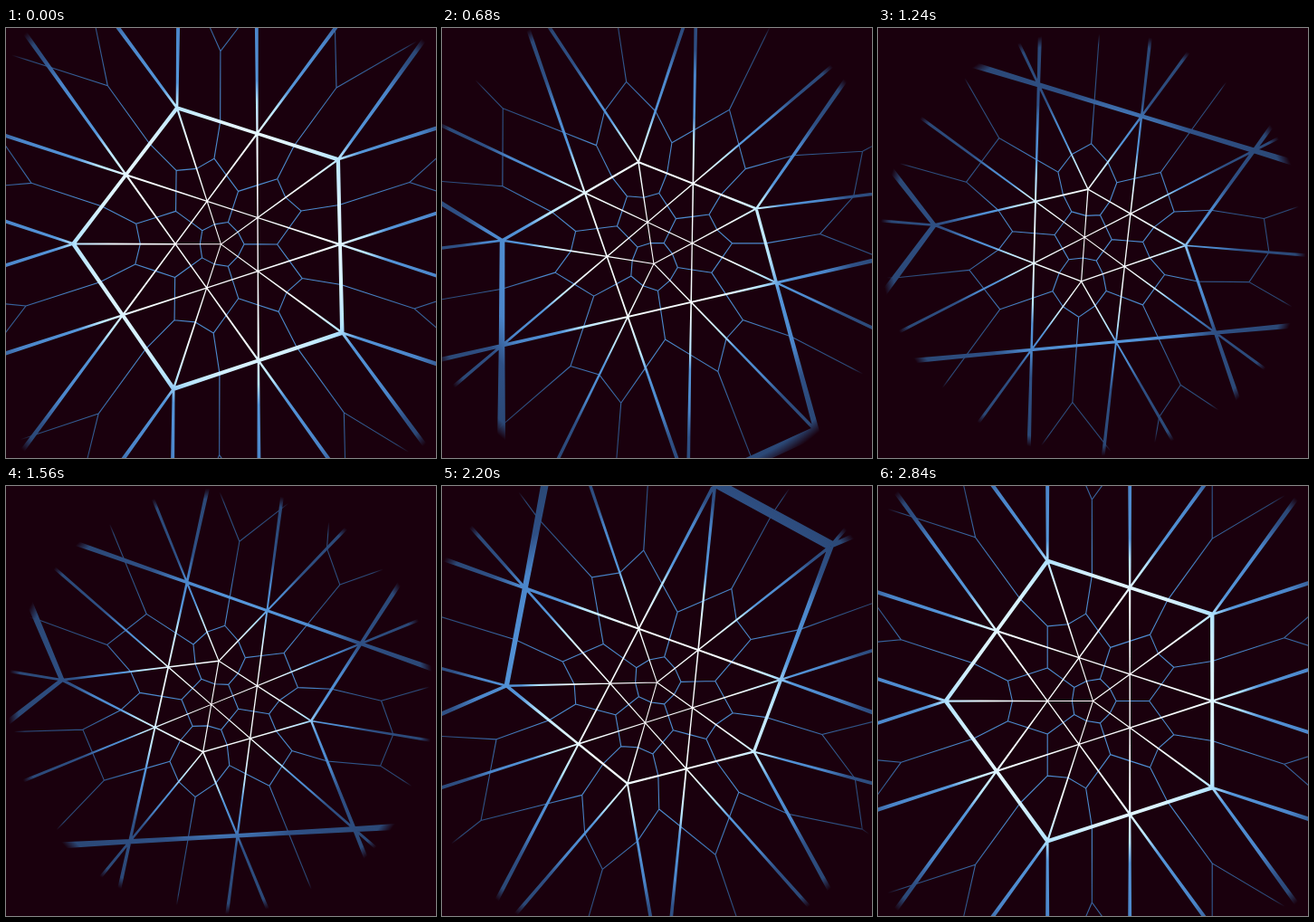
These frames come from a looping animation (475x475 px, 2880 ms). An HTML page:

```html
<!DOCTYPE html>
<html>
<head>
<meta charset="utf-8">
<title>Icosahedral sphere from inside</title>
<style>
html, body { margin: 0; width: 100%; height: 100%; overflow: hidden; background: #1a000d; }
svg { display: block; width: 100vw; height: 100vh; }
</style>
</head>
<body>
<svg viewBox="0 0 475 475">
  <defs>
    <radialGradient id="bold" gradientUnits="userSpaceOnUse" cx="237.5" cy="237.5"></radialGradient>
    <radialGradient id="fine" gradientUnits="userSpaceOnUse" cx="237.5" cy="237.5"></radialGradient>
  </defs>
  <path id="dual" fill="none" stroke="url(#fine)" stroke-width="1.1"/>
  <path id="mesh" fill="url(#bold)"/>
</svg>
<script>
const LOOP = 2880, STEP = 40, MID = 237.5, FOCAL = 81.4, NEAR = 0.17;
const HALF = 0.52 / FOCAL; // half the ribbon width on the unit sphere
const RAD = Math.PI / 180;
const $ = id => document.getElementById(id);

const sum = (...ps) => ps.reduce((s, p) => s.map((v, i) => v + p[i]), [0, 0, 0]);
const scale = (p, k) => p.map(v => v * k);
const dot = (a, b) => a[0] * b[0] + a[1] * b[1] + a[2] * b[2];
const unit = p => scale(p, 1 / Math.sqrt(dot(p, p)));
const center = (...ps) => unit(sum(...ps));
const cross = (a, b) => [a[1] * b[2] - a[2] * b[1], a[2] * b[0] - a[0] * b[2], a[0] * b[1] - a[1] * b[0]];

// Icosahedron with its poles on the first coordinate, the spin axis
const h = 1 / Math.sqrt(5);
const verts = [[1, 0, 0], [-1, 0, 0]];
for (let k = 0; k < 5; k++) {
  const ring = (x, deg) => [x, 2 * h * Math.cos(deg * RAD), 2 * h * Math.sin(deg * RAD)];
  verts.push(ring(h, 72 * k), ring(-h, 72 * k + 36));
}
const near = (a, b) => Math.abs(dot(a, b) - h) < 0.01;

const ribbons = [], threads = [];
function addRibbon(a, b) {
  const n = scale(unit(cross(a, b)), HALF), m = scale(n, -1);
  ribbons.push([sum(a, n), sum(b, n), sum(b, m), sum(a, m)]);
}
function addCell(a, b, c) {
  const mid = center(a, b, c);
  for (const [p, q] of [[a, b], [b, c], [c, a]]) threads.push([mid, center(p, q)]);
}

verts.forEach((a, i) => verts.forEach((b, j) => {
  if (j <= i || !near(a, b)) return;
  const ab = center(a, b);
  addRibbon(a, ab);
  addRibbon(ab, b);
  verts.forEach((c, k) => {
    if (k <= j || !near(a, c) || !near(b, c)) return;
    const bc = center(b, c), ca = center(c, a);
    addRibbon(ab, bc);
    addRibbon(bc, ca);
    addRibbon(ca, ab);
    addCell(a, ab, ca);
    addCell(b, bc, ab);
    addCell(c, ca, bc);
    addCell(ab, bc, ca);
  });
}));

// One fifth of a turn per loop around a gently swaying axis
function camera(phase) {
  const c = 1 - Math.cos(phase), s = Math.sin(phase), s2 = Math.sin(2 * phase);
  const spin = 72 * phase / (2 * Math.PI) - 0.3 * s + 0.3 * s2;
  const tilt = 63.435 + 0.95 * c + 0.15 * s + 0.15 * s2;
  const roll = 3.6 * c - 2.64 * s - 0.56 * s2;
  const [cs, ss, ct, st, cr, sr] =
    [spin, tilt, roll].flatMap(a => [Math.cos(a * RAD), Math.sin(a * RAD)]);
  return p => {
    const u = p[1] * cs - p[2] * ss, v = p[1] * ss + p[2] * cs;
    const x = ct * u - st * p[0], z = ct * p[0] + st * u;
    return [x * cr - v * sr, x * sr + v * cr, z];
  };
}

// Keep the part of a polyline or polygon in front of the near plane
function clip(pts, closed) {
  const out = [];
  pts.forEach((p, i) => {
    if (p[2] >= NEAR) out.push(p);
    if (!closed && i === pts.length - 1) return;
    const q = pts[(i + 1) % pts.length];
    if ((p[2] < NEAR) !== (q[2] < NEAR)) {
      const k = (NEAR - p[2]) / (q[2] - p[2]);
      out.push(p.map((v, n) => v + (q[n] - v) * k));
    }
  });
  return out;
}

function trace(shapes, view, closed) {
  let d = "";
  for (const shape of shapes) {
    const pts = clip(shape.map(view), closed);
    if (pts.length < 2) continue;
    d += "M" + pts.map(([x, y, z]) =>
      (MID + FOCAL * x / z).toFixed(2) + " " + (MID + FOCAL * y / z).toFixed(2)).join("L");
    if (closed) d += "Z";
  }
  return d;
}

function shade(id, radius, stops) {
  const g = $(id);
  g.setAttribute("r", radius);
  g.innerHTML = stops.map(([at, color, alpha = 1]) =>
    `<stop offset="${at}" stop-color="${color}" stop-opacity="${alpha}"/>`).join("");
}

function draw(time) {
  const frame = Math.floor((time % LOOP) / STEP) + 1;
  const phase = 2 * Math.PI * frame * STEP / LOOP;
  const view = camera(phase), c = Math.cos(phase);
  const reach = 275 + 42 * c;
  const white = 0.475 + 0.055 * c, blue = 0.74 + 0.1 * c;
  shade("bold", reach, [
    [0, "#ffffff"], [white - 0.16, "#f4fdff"], [white - 0.02, "#b4e4ff"],
    [white + 0.05, "#5596da"], [blue - 0.05, "#4a84c8"],
    [blue + 0.05, "#2f5085"], [0.95, "#2b4876"], [1, "#2b4876", 0]
  ]);
  shade("fine", reach, [
    [0, "#4f8fd4"], [white, "#4a86ca"], [white + 0.12, "#3d70b0"],
    [blue, "#30558a"], [0.93, "#2b4876"], [0.98, "#2b4876", 0]
  ]);
  $("dual").setAttribute("d", trace(threads, view, false));
  $("mesh").setAttribute("d", trace(ribbons, view, true));
}

const start = performance.now();
function tick() {
  draw(performance.now() - start);
  requestAnimationFrame(tick);
}
tick();
</script>
</body>
</html>
```
